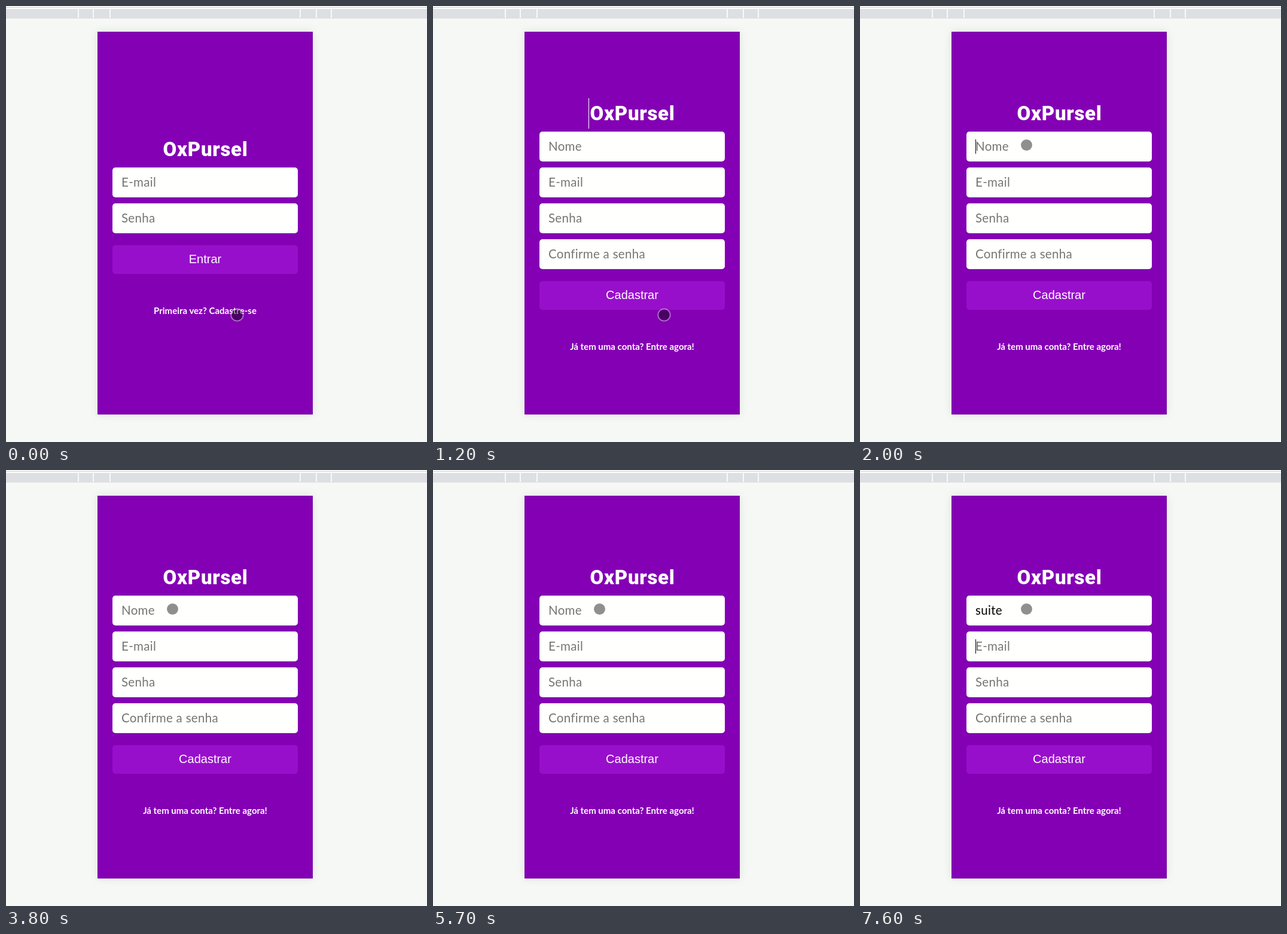
An HTML page that plays this animation: 704x729 px, repeating every 8000 ms.

```html
<!DOCTYPE html>
<html lang="pt-BR">
<head>
<meta charset="utf-8">
<title>Login e cadastro</title>
<style>
  html, body { margin: 0; width: 100%; height: 100%; overflow: hidden; background: #f6f8f6; }
  svg { display: block; width: 704px; height: 729px; }
  text { white-space: pre; }
  .brand { font: 900 33px Roboto, sans-serif; letter-spacing: .7px; fill: #fff; text-anchor: middle; }
  .field { font: 400 20.5px Lato, sans-serif; letter-spacing: .3px; fill: #757575; }
  .typed { fill: #000; }
  .button { font: 400 20px "Liberation Sans", Arial, sans-serif; fill: #fff; text-anchor: middle; }
  .link { font: 700 15px Lato, sans-serif; fill: #fff; text-anchor: middle; }
</style>
</head>
<body>
<svg id="stage" viewBox="0 0 704 729" xmlns="http://www.w3.org/2000/svg">
  <defs>
    <filter id="soft" x="-20%" y="-20%" width="140%" height="140%"><feGaussianBlur stdDeviation="8"/></filter>
  </defs>
  <rect width="704" height="729" fill="#f6f8f6"/>
  <rect y="2" width="704" height="1" fill="#d3d4d6"/>
  <rect y="3" width="704" height="2" fill="#fcfdfc"/>
  <rect y="5" width="704" height="16" fill="#dedfe3"/>
  <g id="ticks" fill="#f8f9f8"></g>
  <rect x="153" y="43" width="360" height="640" fill="#000" opacity=".09" filter="url(#soft)"/>
  <rect x="153" y="43" width="360" height="640" fill="#8400b4"/>
  <rect x="153.5" y="43.5" width="359" height="639" fill="none" stroke="#7500a2"/>
  <g id="login"></g>
  <g id="signup"></g>
  <rect id="caret" width="1"/>
  <g id="pointer">
    <circle r="9.6" fill="#000" fill-opacity=".44"/>
    <circle r="10.2" fill="none" stroke="#fff" stroke-opacity=".42" stroke-width="1.8"/>
  </g>
</svg>
<script>
const LOOP = 8000, BRAND = "OxPursel", LEFT = 193;
const $ = id => document.getElementById(id);

function add(parent, tag, attrs, text) {
  const el = document.createElementNS("http://www.w3.org/2000/svg", tag);
  for (const key in attrs) el.setAttribute(key, attrs[key]);
  if (text) el.textContent = text;
  parent.appendChild(el);
  return el;
}

// Stacks title, fields, button and link below the given top; returns the field labels.
function buildForm(parent, top, names, action, link) {
  add(parent, "text", { class: "brand", x: 333.5, y: top - 19 }, BRAND);
  const labels = names.map((name, i) => {
    const y = top + i * 60;
    add(parent, "rect", { x: 178, y: y + 1, width: 310, height: 50, rx: 5, fill: "#7500a2" });
    add(parent, "rect", { x: 178, y, width: 310, height: 50, rx: 5, fill: "#fffffd" });
    return add(parent, "text", { class: "field", x: LEFT, y: y + 32 }, name);
  });
  const y = top + names.length * 60 + 10;
  add(parent, "rect", { x: 178, y, width: 310, height: 48, rx: 5, fill: "#980fcb" });
  add(parent, "text", { class: "button", x: 333, y: y + 30 }, action);
  add(parent, "text", { class: "link", x: 333, y: y + 115 }, link);
  return labels;
}

for (const x of [120, 145, 173, 491, 518, 543])
  add($("ticks"), "rect", { x, y: 5, width: 2, height: 15 });

buildForm($("login"), 270, ["E-mail", "Senha"], "Entrar", "Primeira vez? Cadastre-se");
const [nameLabel] = buildForm($("signup"), 210,
  ["Nome", "E-mail", "Senha", "Confirme a senha"], "Cadastrar", "Já tem uma conta? Entre agora!");

// Each track is a list of [start, value] steps.
const pointerTrack = [[0, [386.5, 516.5]], [1600, [287.5, 314]], [1800, [282.5, 255]], [2000, [278.5, 232.5]]];
const typedTrack = [[0, ""], [5200, "s"], [5500, ""], [6800, "su"], [7000, "sui"], [7100, "suit"], [7500, "suite"]];
const caretTrack = [
  [0, ""], [1000, "email"], [1200, "title"], [1600, ""],
  [2000, "name"], [2700, ""], [3000, "name"], [3800, ""], [4000, "name"], [4800, ""],
  [5200, "name"], [5700, ""], [6200, "name"], [7600, "email"]
];

function at(track, t) {
  let value;
  for (const [start, v] of track) if (t >= start) value = v;
  return value;
}

function placeCaret(where, typed) {
  const caret = $("caret");
  const end = typed ? Math.round(nameLabel.getComputedTextLength()) : 0;
  const spots = {
    title: [260, 154, 51, "#fff"],
    name: [LEFT + end, 223, 24, "#000"],
    email: [LEFT, 283, 24, "#000"]
  };
  caret.style.display = where ? "" : "none";
  if (!where) return;
  const [x, y, height, fill] = spots[where];
  for (const [key, v] of Object.entries({ x, y, height, fill })) caret.setAttribute(key, v);
}

function render(t) {
  const signup = t >= 1200, typed = at(typedTrack, t);
  $("login").style.display = signup ? "none" : "";
  $("signup").style.display = signup ? "" : "none";
  nameLabel.textContent = typed || "Nome";
  nameLabel.setAttribute("class", typed ? "field typed" : "field");
  placeCaret(at(caretTrack, t), typed);
  $("pointer").setAttribute("transform", `translate(${at(pointerTrack, t)})`);
}

const began = performance.now();
function tick() {
  render((performance.now() - began) % LOOP);
  requestAnimationFrame(tick);
}
tick();
</script>
</body>
</html>
```
